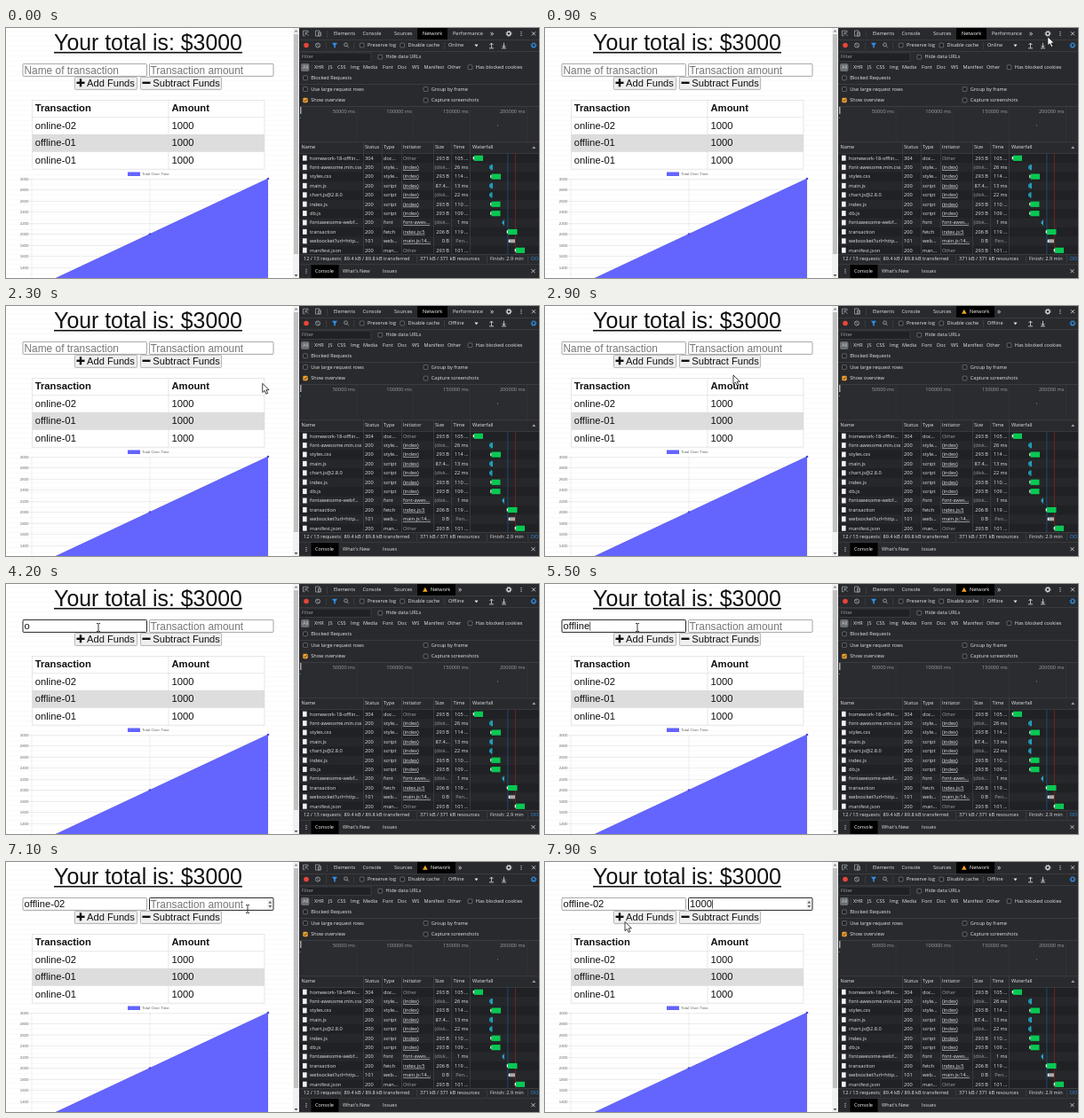
Animation, 600 px wide and 282 px high, one loop 8 s. Source, as an HTML page:

```html
<!DOCTYPE html>
<html lang="en">
<head>
<meta charset="utf-8">
<title>Budget page offline</title>
<style>
html, body { margin: 0; width: 100%; height: 100%; overflow: hidden; background: #fff; }
svg { display: block; width: 600px; height: 282px; }
text { white-space: pre; }
.page { font-family: "Liberation Sans", Arial, sans-serif; }
.tools { font-family: "Open Sans", "Noto Sans", sans-serif; font-weight: 500; }
</style>
</head>
<body>
<svg id="stage" viewBox="0 0 600 282"></svg>
<script>
const stage = document.getElementById('stage');
const rect = (x, y, w, h, fill, more = '') =>
  `<rect x="${x}" y="${y}" width="${w}" height="${h}" fill="${fill}" ${more}/>`;
const path = (d, color, w = 0.8, more = '') =>
  `<path d="${d}" fill="none" stroke="${color}" stroke-width="${w}" ${more}/>`;
const shape = (d, fill, more = '') => `<path d="${d}" fill="${fill}" ${more}/>`;
const dot = (x, y, r, fill, more = '') => `<circle cx="${x}" cy="${y}" r="${r}" fill="${fill}" ${more}/>`;
const text = (x, y, s, size, fill, more = '') =>
  `<text x="${x}" y="${y}" font-size="${size}" fill="${fill}" ${more}>${s}</text>`;

function page() {
  let s = rect(0, 0, 330, 282, '#fff');
  for (let y = 3; y < 282; y += 5.6) s += rect(0, y, 323, 1, '#f9f9f9');

  // scroll bar
  s += rect(323, 0, 7, 282, '#f1f1f1') + rect(324, 7, 5, 248, '#c1c1c1');
  s += shape('M324.5 4.5h4l-2-2.5z', '#888') + shape('M324.5 278h4l-2 2.5z', '#555');
  s += text(160, 24.8, 'Your total is: $3000', 24.85, '#111', 'text-anchor="middle"') + rect(54, 26.9, 212, 1.6, '#111');

  // form
  s += rect(19, 40.4, 139.5, 14, '#fff', 'id="box0" rx="1"') + rect(161.5, 40.4, 139.5, 14, '#fff', 'id="box1" rx="1"');
  s += text(20.5, 51.7, 'Name of transaction', 11.9, '#777', 'id="hint0"') +
       text(162.5, 51.7, 'Transaction amount', 11.9, '#777', 'id="hint1"');
  s += text(20.5, 51.3, '', 11.2, '#111', 'id="val0"') + text(163, 51.3, '', 11.2, '#111', 'id="val1"');
  s += rect(0, 42.5, 0.7, 10, '#111', 'id="caret"');
  s += `<g id="spin">${rect(294.5, 42, 5.5, 11, '#eee')}${shape('M295.5 46.5h3.6l-1.8-2.6zM295.5 49h3.6l-1.8 2.6z', '#555')}</g>`;
  for (const [x, w, label, tx] of [[77, 71, 'Add Funds', 91], [151, 92, 'Subtract Funds', 165.3]]) {
    s += rect(x + 0.4, 55.4, w - 0.8, 14, '#efefef', 'stroke="#999" stroke-width=".7" rx="1"');
    s += rect(x + 2.5, 60.6, 9, 2.4, '#111') + text(tx, 65.8, label, 11.15, '#111');
  }
  s += rect(82.8, 57.3, 2.4, 9, '#111');

  // table
  s += rect(29.5, 81.5, 261.5, 77.5, '#fff') + rect(29.5, 120, 261.5, 19.4, '#ddd');
  for (let i = 0; i < 5; i++) s += rect(29, 81 + i * 19.45, 262, 0.7, '#ddd');
  for (const x of [29, 182.6, 290.6]) s += rect(x, 81, 0.7, 78, '#ddd');
  [['Transaction', 'Amount'], ['online-02', 1000], ['offline-01', 1000], ['online-01', 1000]].forEach((row, i) =>
    row.forEach((v, j) => s += text(j ? 186.5 : 32.7, 94.2 + i * 19.5, v, 11.25, '#111', i ? '' : 'font-weight="700"')));

  // chart
  for (let i = 0; i < 9; i++) {
    const y = 170 + i * 12.5;
    s += rect(26, y, 269, 0.5, '#ddd') + text(25.5, y + 1.6, 3000 - i * 200, 4.4, '#666', 'text-anchor="end"');
  }
  for (const x of [29, 162, 295]) s += rect(x - 0.25, 170, 0.5, 112, '#ddd');
  s += shape('M29 295L162 232.5L295 170V295z', '#6464ff') + path('M29 295L162 232.5L295 170', '#5a5aea');
  s += dot(162, 232.5, 1.3, '#4c4cd8') + dot(295, 170, 1.3, '#4c4cd8');
  s += rect(137, 162.5, 14, 4.5, '#6464ff') + text(153, 166.4, 'Total Over Time', 4.4, '#666');
  return s;
}

const LIGHT = '#e3e5e8', GREY = '#9aa0a6', LINE = '#45484c', BAR = '#292a2d', DARK = '#202124', BLUE = '#2f8fe8';
const label = (x, y, s, fill = LIGHT, more = '') => text(x, y + 1.7, s, 5.6, fill, more);
const vline = (x, y, h = 8) => rect(x, y, 0.6, h, LINE);
const gear = (x, y, c) => dot(x, y, 2, 'none', `stroke="${c}" stroke-width="1.2"`) +
  dot(x, y, 3, 'none', `stroke="${c}" stroke-width=".8" stroke-dasharray="1.2 1.156"`);
const kebab = (x, y) => [-2, 0, 2].map(d => dot(x, y + d, 0.6, LIGHT)).join('');
const cross = (x, y) => path(`M${x - 2} ${y - 2}l4 4m0-4l-4 4`, LIGHT);
const more = (x, y) => text(x, y + 2.2, '»', 8.5, LIGHT);
const check = (x, y, s, on) =>
  rect(x - 2.4, y - 2.4, 4.8, 4.8, on ? '#f0a030' : DARK, `rx=".8" stroke="${on ? '#f0a030' : '#8a8d91'}" stroke-width=".6"`) +
  (on ? path(`M${x - 1.4} ${y}l1 1.2l2-2.4`, DARK) : '') + label(x + 6.3, y, s);

const requests = [
  ['homework-18-offlin…', 304, 'doc…', 'Other', '293 B', '105 …', 527, 10],
  ['font-awesome.min.css', 200, 'style…', '(index)', '(disk…', '26 ms', 545.5, 2.5],
  ['styles.css', 200, 'style…', '(index)', '293 B', '114 …', 546.5, 10.5],
  ['main.js', 200, 'script', '(index)', '87.4…', '13 ms', 545.5, 2.5],
  ['chart.js@2.8.0', 200, 'script', '(index)', '(disk…', '22 ms', 545.5, 2],
  ['index.js', 200, 'script', '(index)', '293 B', '110 …', 546.5, 10],
  ['db.js', 200, 'script', '(index)', '293 B', '109 …', 546.5, 10],
  ['fontawesome-webf…', 200, 'font', 'font-awes…', '(disk…', '1 ms', 560, 1],
  ['transaction', 200, 'fetch', 'index.js:5', '206 B', '119 …', 565, 10.5],
  ['websocket?url=http…', 101, 'web…', 'main.js:14…', '0 B', 'Pen…', 567, 6],
  ['manifest.json', 200, 'man…', 'Other', '293 B', '101 …', 574, 10]
];
const cols = [342, 404, 425, 447, 499, 520.5];

function tools() {
  let s = rect(330, 0, 270, 282, DARK) + rect(330, 0, 270, 88, BAR) + rect(330, 13, 270, 0.6, LINE) + rect(330, 26, 270, 0.6, LINE);

  // tab strip
  s += path('M336.5 8.7h-2v-5.5h5.5v2M337 5.2l3.5 3.5M337 7.7v-2.5h2.5', GREY) + path('M348.5 3h4.5v6h-4.5zM351.5 5h3v4h-3z', GREY) + vline(361, 3);
  s += label(369, 6.5, 'Elements') + label(401.5, 6.5, 'Console') + label(437, 6.5, 'Sources');
  s += `<g id="tabOn">${rect(463, 0, 34, 13, '#000')}${label(469, 6.5, 'Network', '#fff')}${label(503, 6.5, 'Performance')}${more(545, 6.5)}</g>`;
  s += `<g id="tabOff">${rect(463, 0, 43, 13, '#000')}${shape('M469 8.8l2.8-5l2.8 5z', '#f5a623')}${label(478, 6.5, 'Network', '#fff')}${more(509, 6.5)}</g>`;
  s += gear(566, 6.3, LIGHT) + kebab(580, 6.3) + cross(594, 6.3);

  // controls
  s += dot(338, 19.5, 2.8, '#e8453c') + dot(351, 19.5, 2.5, 'none', `stroke="${GREY}" stroke-width=".9"`) + path('M349.3 17.8l3.4 3.4', GREY);
  s += vline(360, 16) + shape('M367 16.8h6l-2.2 3v3l-1.6-.8v-2.2z', BLUE) + dot(382.5, 18.8, 1.9, 'none', `stroke="${GREY}" stroke-width=".9"`) + path('M383.8 20.2l2 2', GREY);
  s += vline(391.5, 16) + check(400.7, 19.5, 'Preserve log') + check(446.2, 19.5, 'Disable cache') + vline(493, 16);
  s += label(498, 19.5, 'Online', LIGHT, 'id="mode"') + shape('M527.5 18.6h4l-2 2.6z', LIGHT);
  s += path('M546.5 22v-5m-2 2l2-2l2 2M544 22.8h5', LIGHT) + path('M560.5 16.8v5m-2-2l2 2l2-2M558 22.8h5', LIGHT) + gear(594, 19.5, BLUE);

  // filters
  s += rect(331, 28, 80, 9.5, DARK, `stroke="${LINE}" stroke-width=".6"`) + label(333, 32.7, 'Filter', GREY) + check(421.3, 32.7, 'Hide data URLs');
  s += rect(332, 40, 9.5, 9, '#6a6d71', 'rx="2"') + label(334, 44.7, 'All', '#ccc') + vline(344, 40.5);
  const kinds = { XHR: 347, JS: 363, CSS: 373, Img: 388, Media: 402, Font: 424, Doc: 441, WS: 457, Manifest: 470.5, Other: 497 };
  for (const k in kinds) s += label(kinds[k], 44.7, k);
  s += check(522.5, 44.2, 'Has blocked cookies') + check(337, 56.3, 'Blocked Requests');
  s += rect(330, 63, 270, 0.6, LINE) + check(337, 69, 'Use large request rows') + check(472.5, 69, 'Group by frame');
  s += check(337, 81.5, 'Show overview', true) + check(472.5, 81.5, 'Capture screenshots');

  // overview
  s += rect(330, 88, 270, 40.5, '#2b2c2f') + rect(330, 88, 270, 0.6, LINE);
  for (let i = 1; i < 5; i++) {
    const x = 331 + i * 63.8;
    s += rect(x, 89, 0.5, 39, '#36383b') + label(x - 1.8, 94.2, i * 50000 + ' ms', GREY, 'text-anchor="end"');
  }
  s += rect(331, 89, 1.5, 8, '#a8abb0') + rect(331, 101, 1, 1, '#2fa8e0') + rect(553, 109.5, 1, 1, '#2fa8e0');

  // request list
  s += rect(330, 128.5, 270, 12.5, BAR) + rect(330, 128.5, 270, 0.6, LINE) + rect(330, 141, 270, 0.6, LINE);
  ['Name', 'Status', 'Type', 'Initiator', 'Size', 'Time', 'Waterfall'].forEach((h, i) =>
    s += label([332.5, 404, 425, 447, 483, 503.5, 525][i], 134.7, h));
  s += shape('M592.3 136h4l-2-2.8z', GREY);
  requests.forEach((r, i) => {
    const y = 146.9 + i * 10.4;
    if (i % 2) s += rect(330, y - 5.2, 270, 10.4, '#26272a');
    s += rect(334, y - 3.2, 4.6, 6, '#f1f3f4');
    cols.forEach((x, j) => {
      const dim = ['Other', '(disk…', 'Pen…'].includes(r[j]);
      const look = j > 3 ? 'text-anchor="end"' : j === 3 && !dim ? 'text-decoration="underline"' : '';
      s += label(x, y, r[j], dim ? GREY : LIGHT, look);
    });
  });
  for (const x of [402, 423, 445, 481, 501.5, 522]) s += vline(x, 129, 126);
  s += rect(564.5, 141, 0.8, 114, '#1f5286') + rect(573, 141, 0.8, 114, '#7a2626');
  requests.forEach((r, i) => {
    const [x, w] = r.slice(6), y = 143.7 + i * 10.4, thin = w < 5, waiting = i === 9;
    s += rect(x - 1.3, y + 1.3, 1.5, 3.4, thin ? '#2fa8e0' : '#e8eaed');
    s += rect(x, y + waiting, w, waiting ? 4 : 6.2, waiting ? '#aaa' : thin ? '#1e9fb5' : '#08c853');
  });

  // summary and drawer
  s += rect(330, 255, 270, 27, BAR) + rect(330, 255, 270, 0.6, LINE) + rect(330, 266.5, 270, 0.6, LINE);
  s += label(335, 260.6, '12 / 13 requests') + label(380.5, 260.6, '89.4 kB / 89.8 kB transferred') +
       label(466, 260.6, '371 kB / 371 kB resources') + label(545, 260.6, 'Finish: 2.9 min') + label(591, 260.6, 'DOMContentLoaded', BLUE);
  for (const x of [377, 462.5, 541, 587.5]) s += vline(x, 257);
  s += kebab(338, 274.3) + rect(343.5, 267, 31, 15, '#000') + label(348, 274.4, 'Console', '#fff') +
       label(379, 274.4, "What's New") + label(424, 274.4, 'Issues') + cross(593.5, 274.2);

  s += `<g id="tip">${rect(496, 28.5, 32, 9.5, DARK)}${label(499, 32.8, 'Throttling')}</g>`;
  return s;
}

stage.innerHTML = `<g class="page">${page()}</g><g class="tools">${tools()}</g>` +
  `<g id="arrow">${shape('M0 0v10.2l2.4-2.2l1.7 3.9l1.8-.8l-1.7-3.8h3.2z', '#fff', 'stroke="#111" stroke-width=".8"')}</g>` +
  `<g id="beam">${path('M-2-4.5h1.4l.6.6l.6-.6h1.4M0-4v8M-2 4.5h1.4l.6-.6l.6.6h1.4', '#222', 0.9)}</g>`;
const el = id => document.getElementById(id);
const show = (id, on) => el(id).setAttribute('display', on ? 'inline' : 'none');

// pointer path: time, x, y
const route = [[700, 594, 3], [1000, 556, 12], [1300, 532, 16], [1700, 532, 16], [1900, 512, 110], [2100, 508, 114],
  [2400, 212, 78], [2900, 212, 78], [3300, 104, 49], [6200, 104, 49], [6600, 272, 53], [7600, 272, 53], [7900, 90, 67.5], [8000, 90, 67.5]];
// keystrokes: time, value
const keys = [
  [[3400, ''], [3700, 'o'], [4300, 'of'], [4900, 'off'], [5100, 'offl'], [5200, 'offlin'], [5300, 'offline'],
    [5600, 'offline-'], [5800, 'offline-0'], [6000, 'offline-02']],
  [[6600, ''], [7200, '1'], [7300, '10'], [7400, '100'], [7500, '1000']]
];

function pointer(t) {
  const i = route.findIndex(p => p[0] > t);
  if (i < 1) return null;
  const [a, b] = [route[i - 1], route[i]];
  const u = (t - a[0]) / (b[0] - a[0]), e = u * u * (3 - 2 * u);
  return [a[1] + (b[1] - a[1]) * e, a[2] + (b[2] - a[2]) * e];
}

function draw(t) {
  const focus = t < 3400 ? -1 : t < 6600 ? 0 : 1;
  show('caret', false);
  keys.forEach((list, i) => {
    const last = list.filter(k => k[0] <= t).pop() || [0, ''], val = el('val' + i);
    val.textContent = last[1];
    show('hint' + i, !last[1]);
    el('box' + i).setAttribute('stroke', focus === i ? '#222' : '#8f8f8f');
    el('box' + i).setAttribute('stroke-width', focus === i ? 1 : 0.8);
    if (focus === i) {
      show('caret', (t - last[0]) % 1000 < 500);
      el('caret').setAttribute('x', +val.getAttribute('x') + (last[1] ? val.getComputedTextLength() : 0) + 0.3);
    }
  });
  show('spin', focus === 1);
  show('tip', t >= 1300 && t < 1800);
  el('mode').textContent = t < 2100 ? 'Online' : 'Offline';
  show('tabOn', t < 2500);
  show('tabOff', t >= 2500);

  const p = pointer(t);
  const inField = p && p[1] > 40 && p[1] < 55 && p[0] > 19 && p[0] < 301;
  show('arrow', p && !inField);
  show('beam', inField);
  if (p) for (const id of ['arrow', 'beam']) el(id).setAttribute('transform', `translate(${p[0]} ${p[1]})`);
}

function tick(now) {
  draw(Math.floor(now % 8000 / 100) * 100);
  requestAnimationFrame(tick);
}
draw(0);
requestAnimationFrame(tick);
</script>
</body>
</html>
```
